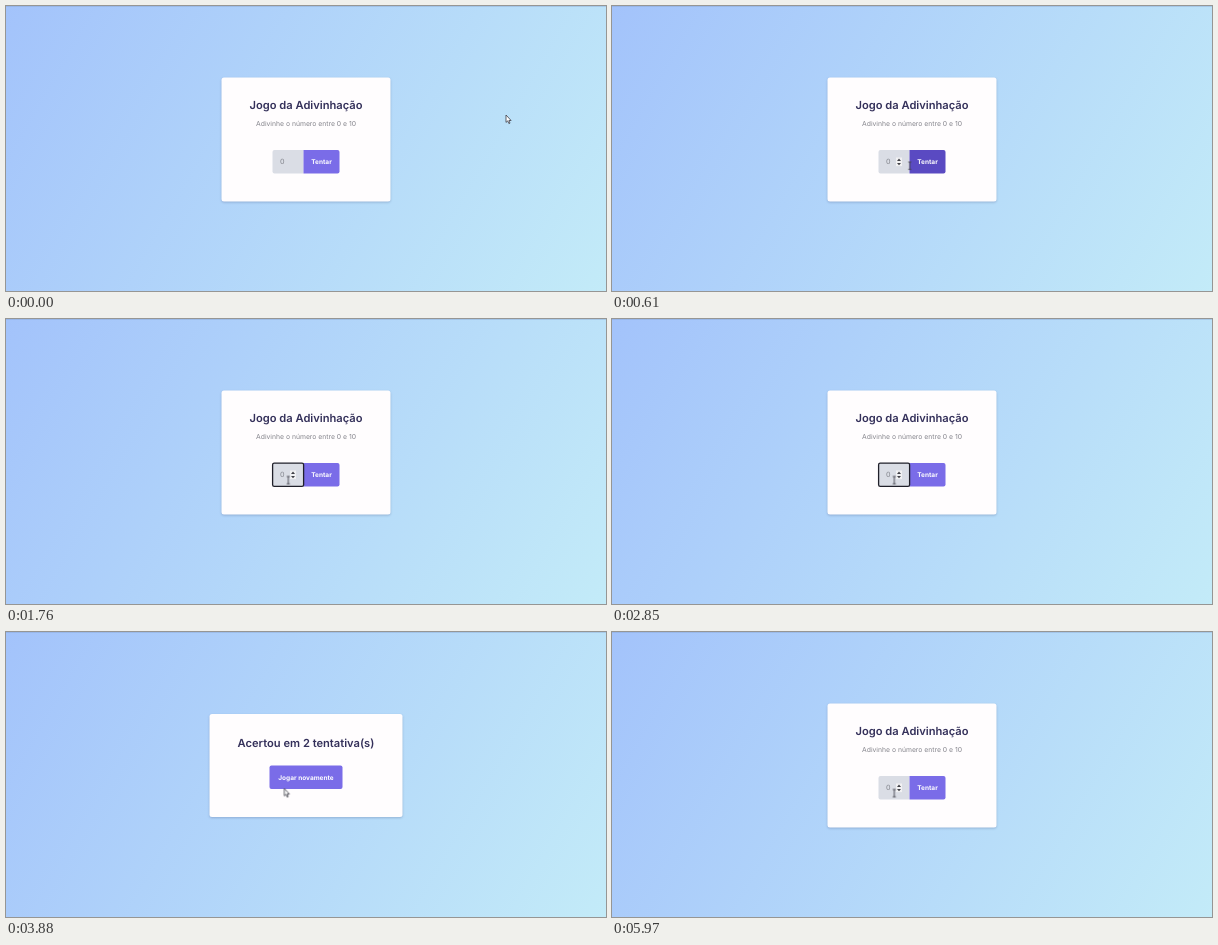
An HTML page for the animation above (6000 ms loop, 600 by 285 pixels).

```html
<!DOCTYPE html>
<html lang="pt">
<head>
<meta charset="utf-8">
<title>Jogo da Adivinhação</title>
<style>
  html, body { margin: 0; width: 100%; height: 100%; overflow: hidden; }
  body { background: linear-gradient(120deg, #a3c3fb, #c3ebf8); }
  svg { display: block; width: 600px; height: 285px; }

  text {
    font-family: Inter, sans-serif;
    text-anchor: middle;
    text-rendering: geometricPrecision;
  }
  .title { font-size: 11.15px; font-weight: 600; fill: #34305a; }
  .hint { font-size: 6.8px; fill: #85858c; }
  .label { font-size: 6.5px; font-weight: 700; fill: #fff; }
  .digit { font-size: 7.2px; fill: #50505c; }
  .zero { fill: #85878f; }

  .card { fill: #fffdfe; filter: drop-shadow(0 1px 1.2px rgba(50, 70, 120, .28)); }
  .button { fill: #7a6ce8; }
  .field { fill: #dadde5; }
  .ring { fill: none; stroke: #20202a; stroke-width: 1.3; }

  /* One 6 s timeline shared by every part; 0.5% = 30 ms. */
  .anim { animation: 6s step-end infinite; }
  .game { animation-name: game; }
  .win { animation-name: win; }
  .spinner, .beam { animation-name: in-field; }
  .focus { animation-name: focus; }
  .empty { animation-name: empty; }
  .first { animation-name: first; }
  .second { animation-name: second; }
  .arrow { animation-name: arrow; }
  .hand { animation-name: hand; }
  .hover { animation: hover 6s linear infinite; }
  .pointer { animation: move 6s linear infinite; }

  @keyframes game { 0%, 99.5% { opacity: 1 } 64.66% { opacity: 0 } }
  @keyframes win { 0%, 99.5% { opacity: 0 } 64.66% { opacity: 1 } }
  @keyframes in-field { 0%, 64.66% { opacity: 0 } 9.9%, 99.5% { opacity: 1 } }
  @keyframes focus { 0%, 64.66% { opacity: 0 } 15.16% { opacity: 1 } }
  @keyframes empty { 0%, 47%, 99.5% { opacity: 1 } 29.8%, 54.5% { opacity: 0 } }
  @keyframes first { 0%, 47% { opacity: 0 } 29.8% { opacity: 1 } }
  @keyframes second { 0%, 64.66% { opacity: 0 } 54.5% { opacity: 1 } }
  @keyframes arrow { 0%, 64.66% { opacity: 1 } 7.5%, 99.5% { opacity: 0 } }
  @keyframes hand { 0%, 9.9% { opacity: 0 } 7.5% { opacity: 1 } }
  @keyframes hover {
    0%, 7.5% { fill: #7a6ce8 }
    9%, 10.4% { fill: #5a4ac2 }
    12.67%, 100% { fill: #7a6ce8 }
  }
  @keyframes move {
    0%, .4% { transform: translate(500px, 109px); animation-timing-function: cubic-bezier(.4, .1, .7, .9) }
    7.5% { transform: translate(332px, 149px); animation-timing-function: ease-out }
    10.16% { transform: translate(294px, 155px); animation-timing-function: ease-out }
    12.67%, 99.99% { transform: translate(278.3px, 156.5px) }
    100% { transform: translate(500px, 109px) }
  }
</style>
</head>
<body>
<svg viewBox="0 0 600 285">
  <rect width="600" height="1" fill="#7f9cc8" opacity=".35"/>

  <g class="anim game">
    <rect class="card" x="215.5" y="71.5" width="169" height="124" rx="2.5"/>
    <text class="title" x="300" y="103">Jogo da Adivinhação</text>
    <text class="hint" x="300" y="120">Adivinhe o número entre 0 e 10</text>

    <path class="field" d="M297.5 144H268.5a2 2 0 0 0-2 2V165.5a2 2 0 0 0 2 2H297.5Z"/>
    <path class="hover" d="M297.5 144H331.5a2 2 0 0 1 2 2V165.5a2 2 0 0 1-2 2H297.5Z"/>
    <text class="label" x="315.5" y="158.2">Tentar</text>

    <text class="digit zero anim empty" x="276.3" y="158.4">0</text>
    <text class="digit anim first" x="276.3" y="158.4">5</text>
    <text class="digit anim second" x="276.3" y="158.4">7</text>

    <g class="anim spinner">
      <rect x="284" y="151.5" width="6" height="8.6" fill="#f1f1f3"/>
      <path d="M285 154.9l2-2.3 2 2.3ZM285 156.9l2 2.3 2-2.3Z" fill="#404046"/>
    </g>
    <rect class="ring anim focus" x="266.6" y="144.1" width="31" height="23.3" rx="1.6"/>
  </g>

  <g class="anim win">
    <rect class="card" x="203.5" y="82" width="193" height="103" rx="2.5"/>
    <text class="title" x="300" y="115">Acertou em 2 tentativa(s)</text>
    <rect class="button" x="263.5" y="133.5" width="73" height="23.5" rx="2"/>
    <text class="label" x="300" y="147.8">Jogar novamente</text>
  </g>

  <g class="pointer">
    <path class="anim arrow" d="M0 0V7.4L1.7 5.9 2.9 8.6 4 8.1 2.9 5.5H5.1Z"
      fill="#fff" stroke="#3c3c46" stroke-width=".8" stroke-linejoin="round"/>
    <path class="anim hand" d="M0 0q1-.6 1.2.4V3l3 .8q.9.3.7 1.3L4.300 8.400H.8L-1.900 5q0-1 1-.6l.9.800Z"
      fill="#fff" stroke="#2c2c38" stroke-width=".7" stroke-linejoin="round"/>
    <path class="anim beam" d="M2.500 1H5.500M4 1V8.300M2.500 8.300H5.500"
      fill="none" stroke="#45454d" stroke-width=".9"/>
  </g>
</svg>
</body>
</html>
```
